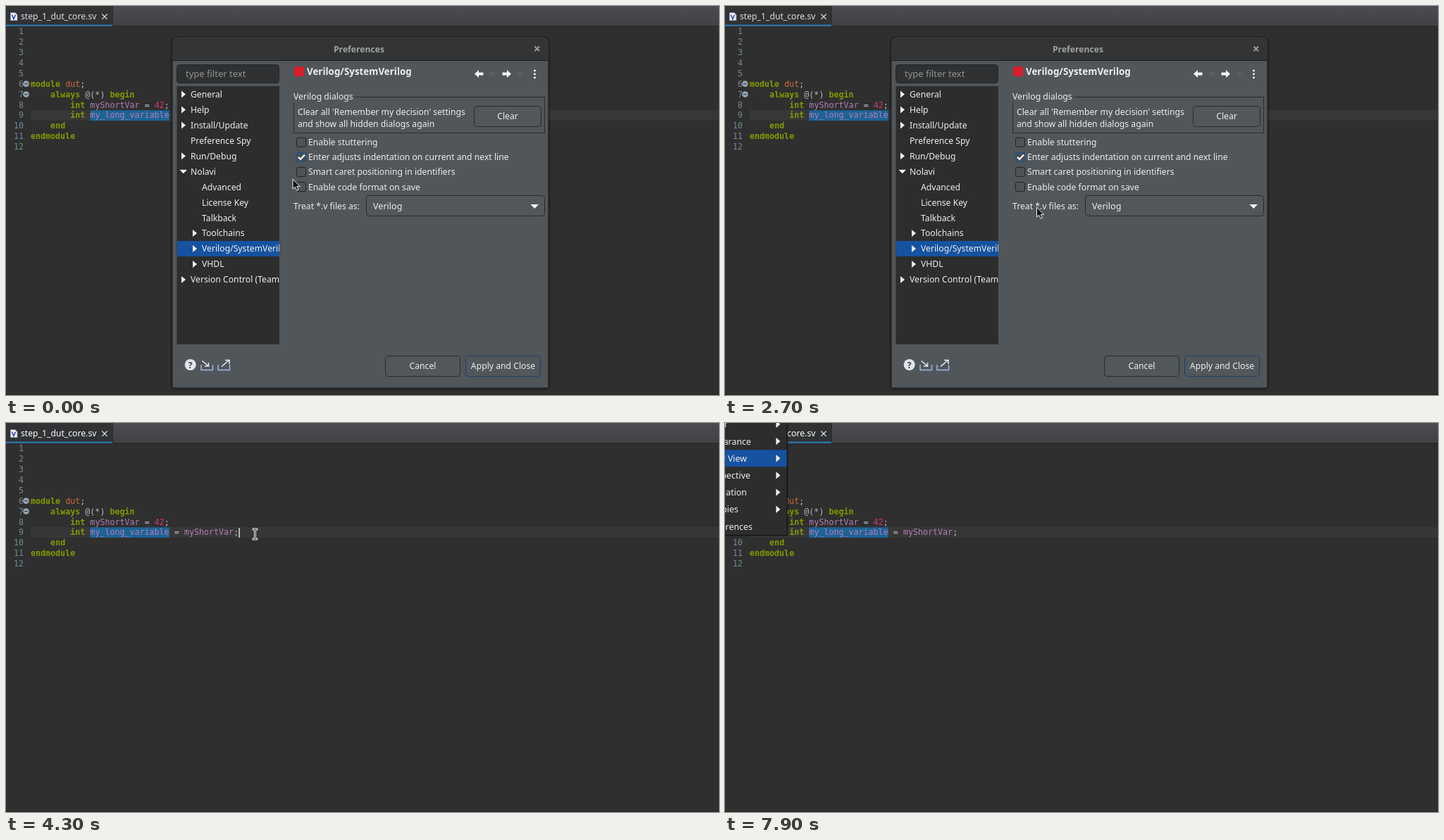
Animation, 1012 px wide and 553 px high, one loop 8 s. Source, as an HTML page:

```html
<!DOCTYPE html>
<html lang="en">
<head>
<meta charset="utf-8">
<title>Editor preferences</title>
<style>
html, body { margin: 0; width: 100%; height: 100%; overflow: hidden; background: #2f2f2f; }
svg { display: block; width: 100%; height: 100%; }
text { font: 12.2px "Noto Sans", sans-serif; fill: #eeeeec; white-space: pre; }
.code text { font: 11.67px "DejaVu Sans Mono", monospace; fill: #b9b9b9; }
.code .kw { font-weight: bold; fill: #859900; }
.code .id { fill: #b57dba; }
.code .mod { fill: #cf6c3b; }
.code .num { fill: #d33673; }
.code .ln { fill: #708b95; }
.bold { font-weight: bold; }
.head { font-size: 13.4px; font-weight: bold; }
.hint { font-size: 13px; fill: #919495; }
.menu text { font-size: 12.4px; }
.btn { fill: #51575a; stroke: #272a2b; }
.white { fill: #f4f4f4; }
.line { fill: none; stroke: #292c2d; }
#caret { fill: #fff; mix-blend-mode: difference; }
</style>
</head>
<body>
<svg viewBox="0 0 1012 553" preserveAspectRatio="none">
  <defs>
    <linearGradient id="bar" x2="0" y2="1"><stop stop-color="#4b4c4f"/><stop offset="1" stop-color="#404246"/></linearGradient>
    <clipPath id="treeClip"><path d="M243 114H388V481H243Z"/></clipPath>
  </defs>

  <rect width="1012" height="553" fill="#2f2f2f"/>
  <rect y="552" width="1012" height="1" fill="#222"/>
  <rect width="1012" height="28" fill="url(#bar)"/>
  <rect y="28" width="1012" height="1" fill="#292a2b"/>
  <rect width="151" height="29" fill="#303234"/>
  <rect y="26.5" width="151" height="2.2" fill="#2f78ad"/>
  <rect x="151" width="1" height="28" fill="#2a2b2d"/>
  <path d="M6.5 9.5H13L16 12.5V20.5H6.5Z" fill="#eef0f5" stroke="#8f98a8" stroke-width=".8"/>
  <path d="M8.5 12.5L11 18.5L13.6 12.5" fill="none" stroke="#2d3fae" stroke-width="1.5"/>
  <text id="tab" x="21" y="19">step_1_dut_core.sv</text>
  <path d="M136.3 11.5L143.7 18.9M143.7 11.5L136.3 18.9" stroke="#dcdcdc" stroke-width="1.3"/>

  <rect x="35" y="148" width="977" height="15" fill="#373737"/>
  <rect x="119.4" y="148.3" width="112.5" height="14.7" fill="#1d6396"/>
  <g id="code" class="code"></g>
  <rect id="caret" y="149" width="1.7" height="14"/>

  <g id="dialog">
    <rect x="233" y="43" width="540" height="504" rx="9" opacity=".16"/>
    <path d="M236 543V52Q236 44 244 44H762Q770 44 770 52V543Z" fill="#505659" stroke="#191a1b"/>
    <path id="titleBar" d="M236.5 77.5V52Q236.5 44.5 244 44.5H762Q769.5 44.5 769.5 52V77.5Z"/>
    <path d="M236 77.5H770" stroke="#1d1e1f"/>
    <text id="title" class="bold" x="501" y="65.5" text-anchor="middle">Preferences</text>
    <path id="close" d="M750.5 57.5L757 64M757 57.5L750.5 64" stroke-width="1.8"/>

    <rect x="242.5" y="83.5" width="145" height="26" rx="4" fill="#2f3031" stroke="#222526"/>
    <text class="hint" x="255" y="101">type filter text</text>
    <rect x="242.5" y="114" width="145.5" height="367" fill="#2d2d2d"/>
    <g id="tree" clip-path="url(#treeClip)"></g>

    <rect x="409" y="86" width="14" height="14" fill="#d81f2a"/>
    <text class="head" x="427" y="97.5">Verilog/SystemVerilog</text>
    <g class="white">
      <path id="arrow" d="M665 96.5L671 91V94.5H677.5V98.5H671V102Z"/>
      <path d="M717 96.5L711 91V94.5H704.5V98.5H711V102Z"/>
      <circle cx="750.5" cy="91.8" r="1.5"/><circle cx="750.5" cy="96.8" r="1.5"/><circle cx="750.5" cy="101.8" r="1.5"/>
    </g>
    <path id="drops" d="M685.5 94.5H695L690.3 99.5ZM725 94.5H734.5L729.8 99.5Z"/>

    <path class="line" d="M495 129.5H764.5V180.5H408.5V137"/>
    <text x="408" y="133">Verilog dialogs</text>
    <text x="414" y="155">Clear all 'Remember my decision' settings</text>
    <text x="414" y="172">and show all hidden dialogs again</text>
    <g id="buttons"></g>
    <g id="checks"></g>
    <text x="408" y="288.5">Treat *.v files as:</text>
    <rect class="btn" x="511.5" y="269.5" width="253" height="29" rx="4"/>
    <text x="521" y="288.7" style="font-size:12.6px">Verilog</text>
    <path class="white" d="M744.5 282H756L750.3 288Z"/>

    <circle cx="261.7" cy="510" r="8" fill="#e3e4ec"/>
    <text class="bold" x="261.7" y="514.7" text-anchor="middle" style="fill:#3b4048">?</text>
    <g fill="none" stroke="#9fb9e2" stroke-width="1.5">
      <path d="M277 510V517.5H293.5V510M301 510V517.5H317.5V510"/>
      <path d="M278.5 504.5L287 511.5M287.5 507V512H282M306 512.5L316 504M311 503.5H317V509" stroke="#e6ecf5"/>
    </g>
  </g>

  <g id="menu" class="menu"></g>
  <path id="pointer" d="M0 0V14L3.2 11.2L5.6 16.4L8 15.3L5.8 10.4H10.2Z" fill="#151515" stroke="#f2f2f2" stroke-width="1"/>
  <g id="beam" fill="none">
    <path d="M-3.8 -7H3.8M0 -7V7M-3.8 7H3.8" stroke="#f4f4f4" stroke-width="2.8"/>
    <path d="M-3 -7H3M0 -7V7M-3 7H3" stroke="#222" stroke-width=".9"/>
  </g>
</svg>
<script>
const $ = id => document.getElementById(id);
const show = (id, on) => $(id).style.display = on ? "" : "none";
const label = (x, y, s, attrs = "") => `<text x="${x}" y="${y}" ${attrs}>${s}</text>`;
const colX = col => 35 + 7.03 * col;
const lineY = n => 40 + 14.93 * (n - 1);

// Code: line, column, class, text
const tokens = [
  [6, 0, "kw", "module"], [6, 7, "mod", "dut"], [6, 10, "", ";"],
  [7, 4, "kw", "always"], [7, 11, "", "@(*)"], [7, 16, "kw", "begin"],
  [8, 8, "kw", "int"], [8, 12, "id", "myShortVar"], [8, 23, "", "="], [8, 25, "num", "42"], [8, 27, "", ";"],
  [9, 8, "kw", "int"], [9, 12, "id", "my_long_variable"], [9, 29, "", "="], [9, 31, "id", "myShortVar"], [9, 41, "", ";"],
  [10, 4, "kw", "end"], [11, 0, "kw", "endmodule"]
];
let code = tokens.map(([n, col, cls, s]) => label(colX(col), lineY(n), s, `class="${cls}"`)).join("");
for (let n = 1; n <= 12; n++) code += label(25, lineY(n), n, 'class="ln" text-anchor="end"');
for (const n of [6, 7]) {
  const y = lineY(n) - 4;
  code += `<circle cx="28.5" cy="${y}" r="4.3" fill="#98a5b0"/><path d="M26 ${y}h5" stroke="#38434c" stroke-width="1.2"/>`;
}
$("code").innerHTML = code;

// Tree: text, level, arrow state (1 closed, 2 open)
const rows = [
  ["General", 0, 1], ["Help", 0, 1], ["Install/Update", 0, 1], ["Preference Spy", 0, 0], ["Run/Debug", 0, 1],
  ["Nolavi", 0, 2], ["Advanced", 1, 0], ["License Key", 1, 0], ["Talkback", 1, 0], ["Toolchains", 1, 1],
  ["Verilog/SystemVerilog", 1, 1], ["VHDL", 1, 1], ["Version Control (Team)", 0, 1]
];
$("tree").innerHTML = '<rect x="243" y="334" width="145" height="22" fill="#1552a0"/>' + rows.map(([s, level, arrow], i) => {
  const x = 262 + 16 * level, y = 125.5 + 21.95 * i;
  const d = ["", `M${x - 13} ${y - 5}l6 5l-6 5Z`, `M${x - 15.5} ${y - 2.5}h10.5l-5.2 5.5Z`][arrow];
  return `<path class="white" d="${d}"/>` + label(x, y + 4.4, s);
}).join("");

$("buttons").innerHTML = [["Clear", 664, 142, 96], ["Cancel", 538, 497, 107], ["Apply and Close", 652, 497, 107]].map(([s, x, y, w]) =>
  `<rect class="btn" x="${x + .5}" y="${y + .5}" width="${w - 1}" height="29" rx="4"/>` +
  label(x + w / 2, y + 19.2, s, 'text-anchor="middle"')).join("");
const apply = $("buttons").querySelectorAll("rect")[2];

$("checks").innerHTML = [
  "Enable stuttering", "Enter adjusts indentation on current and next line",
  "Smart caret positioning in identifiers", "Enable code format on save"
].map((s, i) => {
  const y = 193.7 + 21.1 * i, on = i == 1;
  return `<rect x="412.5" y="${y - 6.5}" width="13" height="13" rx="2" fill="${on ? "#454d57" : "#4d5356"}" stroke="${on ? "#1c559d" : "#202324"}"/>` +
    (on ? `<path d="M415 ${y}l3 3.2l6 -6.4" fill="none" stroke="#fff" stroke-width="2.2"/>` : "") + label(429, y + 4.5, s);
}).join("");

// Menu: text, right edge of the text
const items = [["Editor", 4], ["Appearance", 37], ["Show View", 31], ["Perspective", 36], ["Navigation", 31], ["Copies", 19], ["Preferences", 39]];
$("menu").innerHTML = '<rect width="90" height="161" opacity=".25"/><rect x="-1" y="-1" width="89" height="160.5" fill="#2d2d2d" stroke="#151515"/>' +
  '<rect id="hover" width="87.5" height="24" fill="#1552a0"/>' + items.map(([s, x], i) => {
    const y = 1.8 + 24.2 * i;
    return label(x, y + 4.5, s, 'text-anchor="end"') + (i < 6 ? `<path class="white" d="M72.5 ${y - 5.2}l6 5.2l-6 5.2Z"/>` : "");
  }).join("");

// Mouse: time, x, y
const path = [
  [0, 407, 246], [100, 407, 245], [300, 407, 245], [600, 468, 252], [900, 590, 245], [1200, 653, 236],
  [1400, 633, 225], [1600, 573, 220], [1900, 445, 222], [2100, 404, 227], [2300, 399, 243], [2400, 410, 254],
  [2600, 410, 254], [2800, 475, 318], [3000, 620, 440], [3200, 698, 503], [3500, 698, 504],
  [3600, 605, 408], [3700, 510, 315], [3900, 400, 203], [4200, 352, 157], [4300, 353.5, 158], [5700, 353.5, 158],
  [5800, 353.5, 159], [6600, 353.5, 159], [6700, 310, 146], [6800, 180, 108], [6900, 36, 69], [7000, -90, 30]
];
function mouseAt(t) {
  const k = path.findIndex(p => p[0] > t);
  if (k < 0) return path[path.length - 1].slice(1);
  const [t0, x0, y0] = path[k - 1], [t1, x1, y1] = path[k], f = (t - t0) / (t1 - t0);
  return [x0 + (x1 - x0) * f, y0 + (y1 - y0) * f];
}

// Caret: time, column (-1 hidden)
const carets = [[0, -1], [3600, 12], [4200, -1], [4300, 42], [4900, 41], [5300, 31], [5600, 29], [6000, 12], [6600, -1], [7000, 12], [7400, -1]];

function draw(now) {
  const t = Math.floor(now % 8000 / 100) * 100;
  const active = t >= 3400, closing = t >= 3600;

  const [x, y] = mouseAt(t), typing = t >= 3500;
  show("pointer", !typing);
  show("beam", typing);
  $(typing ? "beam" : "pointer").setAttribute("transform", `translate(${x} ${y})`);

  const col = carets.filter(c => c[0] <= t).pop()[1];
  show("caret", col >= 0);
  $("caret").setAttribute("x", colX(col));

  show("dialog", t < 3700);
  const dialog = $("dialog");
  dialog.setAttribute("transform", closing ? "translate(503 294) scale(.82) translate(-503 -293.5)" : "");
  dialog.style.opacity = closing ? .25 : 1;
  dialog.style.filter = closing ? "brightness(.55)" : "none";
  $("titleBar").style.fill = active ? "#202121" : "#323435";
  $("title").style.fill = active ? "#fff" : "#a0a2a2";
  $("close").style.stroke = active ? "#fff" : "#a0a2a2";
  $("drops").style.fill = active ? "#878c8f" : "#5c6265";
  apply.style.stroke = active ? "#6484b0" : "#233f68";
  $("tab").style.fill = closing ? "#fff" : "#dededc";

  show("menu", t >= 7600);
  show("hover", t >= 7800);
  $("hover").setAttribute("y", t < 7900 ? -10.2 : 38.2);
}
(function loop() {
  draw(performance.now());
  requestAnimationFrame(loop);
})();
</script>
</body>
</html>
```
